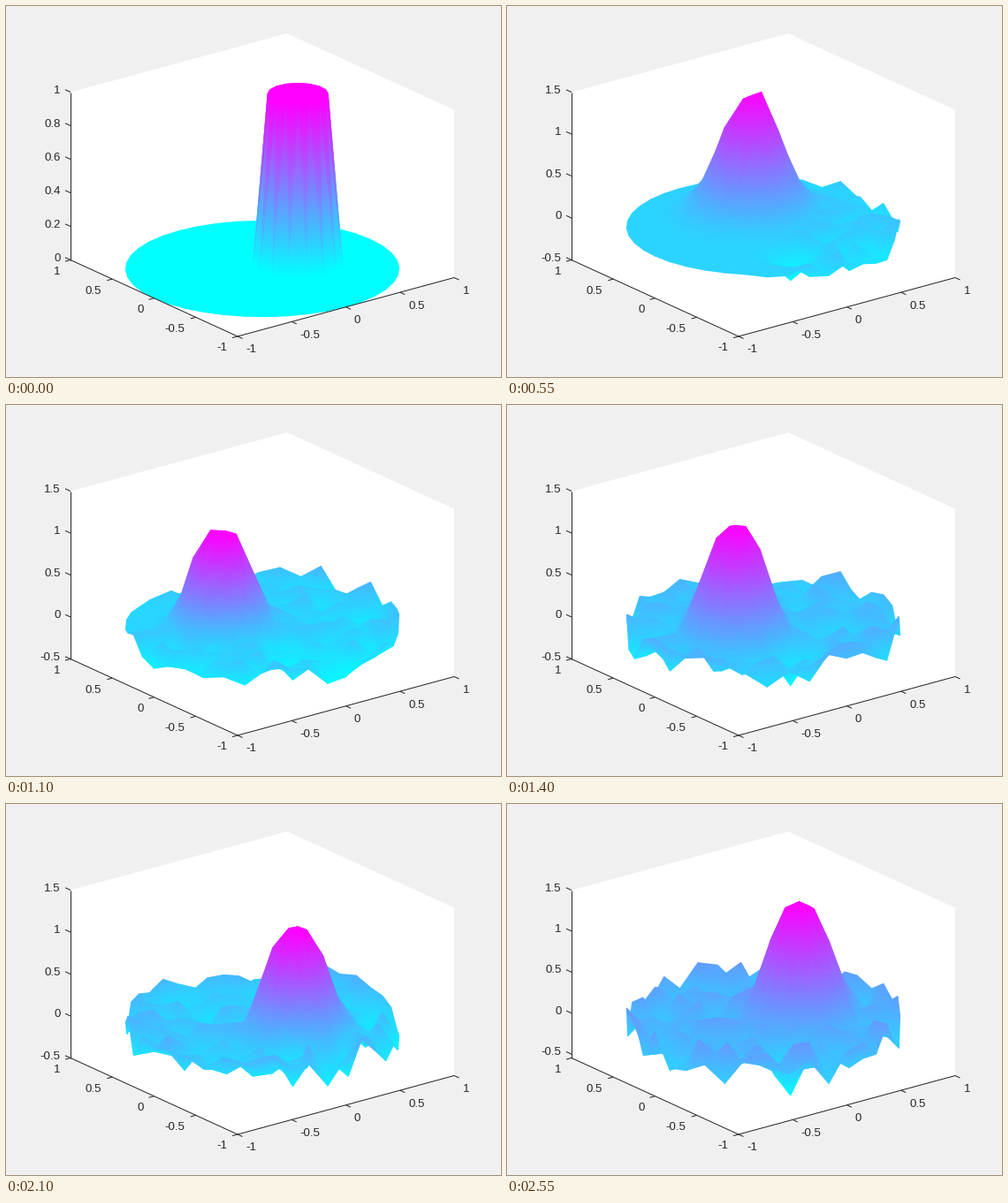
These frames come from a looping animation (560x420 px, 2600 ms). A matplotlib script:

```python
import numpy as np
import matplotlib.pyplot as plt
from matplotlib.animation import FuncAnimation
from matplotlib.collections import LineCollection
from matplotlib.tri import Triangulation

W, H, DPI = 560, 420, 100
FRAMES, STEP = 52, 50
INK = "#262626"
plt.rcParams["font.family"] = "Liberation Sans"

# Oblique box: front corner, its two floor edges and its height in pixels
FRONT = np.array([262.0, 374.0])
EDGE_X = np.array([245.0, -66.5])
EDGE_Y = np.array([-189.0, -86.5])
BOX_H = 190.0
CENTER = FRONT + (EDGE_X + EDGE_Y) / 2
RX, RY = 154.7, 54.2

# Angles are in degrees from screen right, distances in disk radii
EDGE_START = 37.6
TOWER_START, TOWER_ORBIT = 30, 0.3
WAKE_START = -10

rng = np.random.default_rng(11)


def polar(deg, r=1.0):
    a = np.radians(deg)
    return np.stack([r * np.cos(a), r * np.sin(a)], axis=-1)


def ring(r, n, start=0.0):
    return polar(start + np.arange(n) * 360 / n, r)


def distance(points, origin):
    return np.hypot(*(points - origin).T)


def tower_center(k):
    return polar(TOWER_START + 360 * k / (FRAMES - 1), TOWER_ORBIT)


def make_nodes():
    """Rings over the disk, with finer rings where the tower starts."""
    inner = [ring(r, round(52 * r), rng.uniform(0, 360))
             for r in np.arange(0.9, 0.05, -0.1)]
    inner = np.vstack(inner)
    inner += rng.normal(0, 0.014, inner.shape)
    home = tower_center(0)
    inner = inner[distance(inner, home) > 0.42]
    tower = np.vstack([ring(0, 1), ring(0.11, 7), ring(0.22, 16),
                       ring(0.33, 16, 11.25)])
    return np.vstack([ring(1, 40, EDGE_START), inner, home + tower])


nodes = make_nodes()
count = len(nodes)
triangles = Triangulation(*nodes.T).triangles
# Back to front
triangles = triangles[np.argsort(-nodes[triangles, 1].mean(axis=1))]

swing = rng.uniform(0.05, 0.16, count)
swing *= np.where(np.hypot(*nodes.T) > 0.85, 1.3, 1)
phase = rng.uniform(0, 2 * np.pi, count)
speed = rng.uniform(0.25, 0.8, count)
bearing = np.degrees(np.arctan2(nodes[:, 1], nodes[:, 0]))
lag = np.abs((bearing - WAKE_START + 180) % 360 - 180)

sink = nodes[np.argmin(distance(nodes, polar(-72, 0.65)))]
sink_weight = np.exp(-(distance(nodes, sink) / 0.13) ** 2)


def wave(k, period):
    return np.cos(2 * np.pi * (k - 11) / period)


def tower(dist, k):
    """Swings between a blunt and a taller, pointed shape."""
    sharp = 0.5 + 0.5 * wave(k, 23)
    peak = 1.15 + sharp * (0.25 + 0.005 * k)
    power = 3.4 - 1.6 * sharp + 5 * np.exp(-k / 2)
    bump = 0.9 * np.exp(-(dist / 0.28) ** power)
    bump += 0.1 * np.exp(-(dist / 0.38) ** 4)
    return peak, bump / bump.max()


def heights(k):
    dist = distance(nodes, tower_center(k))
    if k == 0:
        return (dist < 0.25).astype(float)
    peak, bump = tower(dist, k)
    spread = np.clip((8 * k - lag) / 40, 0, 1)
    noise = swing * spread * (0.75 + 0.01 * k) * np.sin(phase + speed * k)
    z = peak * bump + noise * (1 - 0.95 * np.sqrt(bump))
    depth = (0.23 + 0.0062 * k) * (0.8 + 0.2 * wave(k, 20)) * min(1, k / 10)
    return z + sink_weight * (-depth - z)


def z_range(z, k):
    if k == 0:
        return 0.0, 1.0, 0.2
    return min(-0.5, z.min()), 2.0 if z.max() > 1.5 else 1.5, 0.5


fig = plt.figure(figsize=(W / DPI, H / DPI), dpi=DPI, facecolor="#f0f0f0")
ax = fig.add_axes([0, 0, 1, 1])
ax.set_xlim(0, W)
ax.set_ylim(H, 0)
ax.axis("off")
ax.autoscale(False)


def label(x, y, text, ha):
    return ax.text(x, y, text, ha=ha, va="center_baseline", color=INK,
                   fontsize=13.2 * 72 / DPI, zorder=5)


UP = np.array([0, -BOX_H])
LEFT, RIGHT = FRONT + EDGE_Y, FRONT + EDGE_X
TICK_X = np.array([5.5, 2.5])
TICK_Y = np.array([-6.0, 1.6])
TICK_Z = np.array([-6.0, -2.7])

ax.fill(*np.array([FRONT, RIGHT, RIGHT + UP, LEFT + EDGE_X + UP,
                   LEFT + UP, LEFT]).T, color="white", lw=0, zorder=0)

fixed = [(LEFT + UP, LEFT), (LEFT, FRONT), (FRONT, RIGHT)]
for v in np.linspace(-1, 1, 5):
    px = FRONT + EDGE_X * (v + 1) / 2
    py = FRONT + EDGE_Y * (v + 1) / 2
    fixed += [(px, px + TICK_X), (py, py + TICK_Y)]
    label(px[0] + 9.5, px[1] + 14, f"{v:g}", "left")
    label(py[0] - 12, py[1] + 12, f"{v:g}", "right")
ax.add_collection(LineCollection(fixed, colors=INK, linewidths=0.72, zorder=4))
z_ticks = LineCollection([], colors=INK, linewidths=0.72, zorder=4)
ax.add_collection(z_ticks)
z_labels = [label(61.5, 0, "", "right") for _ in range(6)]
surface = None


def draw(k):
    global surface
    z = heights(k)
    lo, hi, gap = z_range(z, k)
    scale = BOX_H / (hi - lo)

    if surface is not None:
        surface.remove()
    x = CENTER[0] + RX * nodes[:, 0]
    y = CENTER[1] - RY * nodes[:, 1] - (z - lo) * scale
    surface = ax.tripcolor(Triangulation(x, y, triangles), z, cmap="cool",
                           shading="gouraud", vmin=z.min(), vmax=z.max(),
                           zorder=2)

    values = np.arange(np.ceil(lo / gap), hi / gap + 0.01) * gap
    marks = [LEFT - [0, (v - lo) * scale] for v in values]
    z_ticks.set_segments([(p, p + TICK_Z) for p in marks])
    for i, text in enumerate(z_labels):
        shown = i < len(values)
        text.set_text(f"{values[i]:g}" if shown else "")
        if shown:
            text.set_y(marks[i][1] - 3.4)
    return [surface, z_ticks, *z_labels]


anim = FuncAnimation(fig, draw, frames=FRAMES, interval=STEP, repeat=True,
                     repeat_delay=0, blit=False)
plt.show()
```
